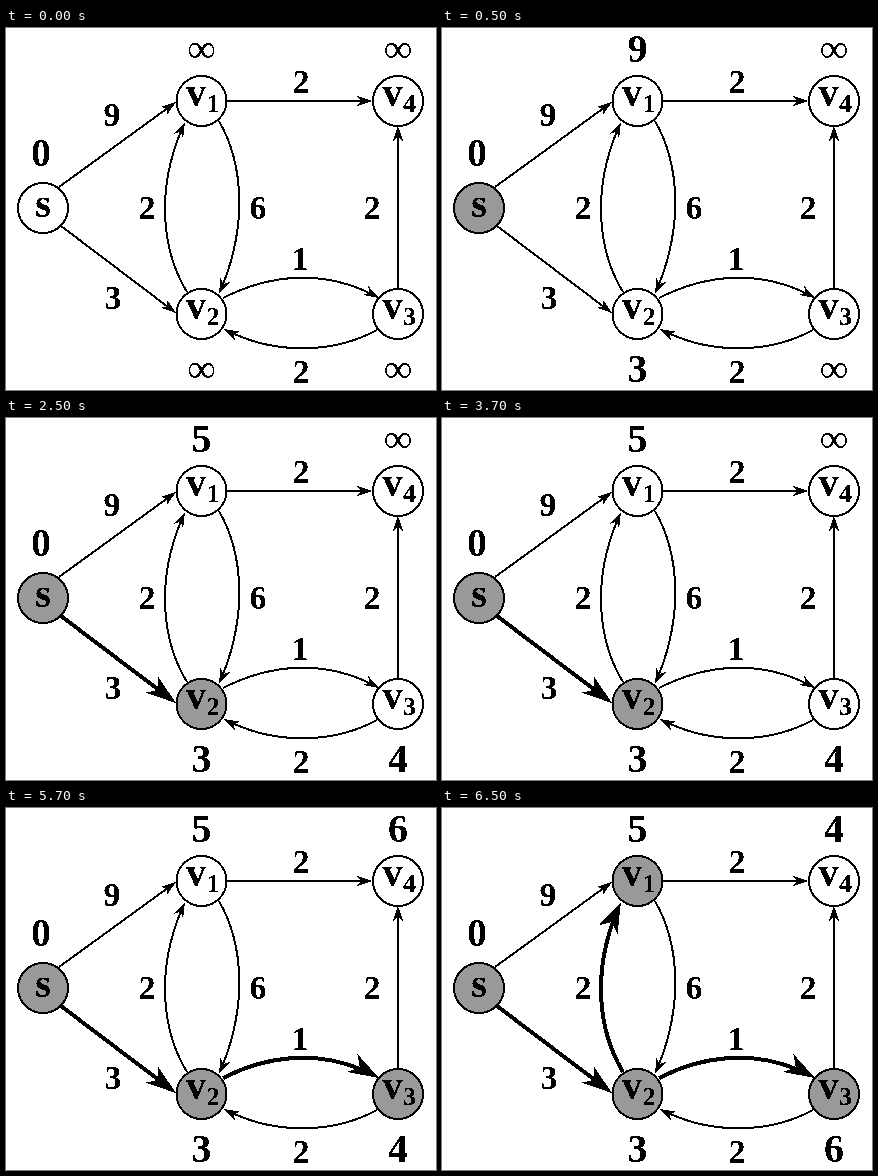
These frames come from a looping animation (430 by 362 pixels, 8 s). An HTML page:

```html
<!DOCTYPE html>
<html lang="en">
<head>
<meta charset="utf-8">
<title>Shortest paths</title>
<style>
  html, body { margin: 0; width: 100%; height: 100%; overflow: hidden; background: #fff; }
  svg { display: block; width: 430px; height: 362px; shape-rendering: crispEdges; }
  text { font: bold 34px "Liberation Serif", "Times New Roman", serif; text-anchor: middle; filter: url(#crisp); }
  .dist, .name { font-size: 40px; }
  .inf { font-weight: normal; }
  .sub { font-size: 26px; }
  .edge { fill: none; stroke: #000; marker-end: url(#tip); }
  circle { stroke: #000; stroke-width: 2; }
</style>
</head>
<body>
<svg id="stage" viewBox="0 0 430 362">
  <defs>
    <marker id="tip" viewBox="-8 -4 8 8" refX="0" refY="0" markerWidth="8" markerHeight="8" orient="auto">
      <path d="M0 0L-7.7 -2.6L-5.5 0L-7.7 2.6Z"/>
    </marker>
    <filter id="crisp">
      <feComponentTransfer><feFuncA type="discrete" tableValues="0 1"/></feComponentTransfer>
    </filter>
  </defs>
</svg>
<script>
const LOOP = 8000;
const STARTS = [0, 500, 2500, 4500, 6500];
const THIN = 2, BOLD = 4;
const NEVER = 9;
const stage = document.getElementById('stage');

function add(tag, attrs, text = '') {
  const el = document.createElementNS('http://www.w3.org/2000/svg', tag);
  for (const key in attrs) el.setAttribute(key, attrs[key]);
  el.textContent = text;
  return stage.appendChild(el);
}

// path, weight, weight x, weight baseline, step at which the edge joins the tree
const edges = [
  ['M53 159L170 74', 9, 106, 98, NEVER],
  ['M55 198L170 285', 3, 107, 281, 2],
  ['M221 73H366', 2, 295, 65, NEVER],
  ['M392 261V98', 2, 366, 191, NEVER],
  ['M181 264C152 216 152 152 179 94', 2, 141, 191, 4],
  ['M213 93C240 140 240 205 213 266', 6, 252, 191, NEVER],
  ['M217 270C270 243 325 243 373 270', 1, 294, 242, 3],
  ['M371 302C325 327 265 326 218 301', 2, 295, 355, NEVER]
].map(([d, weight, x, y, join]) => {
  add('text', { x, y }, weight);
  const path = add('path', { d, class: 'edge' });
  return { path, join, length: path.getTotalLength() };
});

// name, index, centre, label baseline, step at which it is settled, label per step
const nodes = [
  ['s', '', 37, 180, 138, 1, '00000'],
  ['v', 1, 195.5, 73, 34, 4, '∞9555'],
  ['v', 2, 195.5, 286, 354, 2, '∞3333'],
  ['v', 3, 392, 286, 354, 3, '∞∞446'],
  ['v', 4, 392, 73, 34, NEVER, '∞∞∞64']
].map(([name, index, x, y, base, settle, labels]) => {
  const ring = add('circle', { cx: x, cy: y, r: 25 });
  add('text', { x: index ? x - 5.5 : x, y: y + (index ? 5 : 9), class: 'name' }, name);
  if (index) add('text', { x: x + 11.5, y: y + 11, class: 'sub' }, index);
  const label = add('text', { x: index ? x : 35, y: base });
  return { ring, label, settle, labels };
});

function show(step) {
  for (const { path, join, length } of edges) {
    const width = step >= join ? BOLD : THIN;
    path.setAttribute('stroke-width', width);
    // stop the line inside the arrowhead so its point stays sharp
    path.setAttribute('stroke-dasharray', `${length - 5 * width} 999`);
  }
  for (const { ring, label, settle, labels } of nodes) {
    const value = labels[step];
    ring.setAttribute('fill', step >= settle ? '#999' : '#fff');
    label.textContent = value;
    label.setAttribute('class', value === '∞' ? 'dist inf' : 'dist');
  }
}

let begin, current;
function frame(now) {
  begin ??= now;
  const t = (now - begin) % LOOP;
  const step = STARTS.filter(start => start <= t).length - 1;
  if (step !== current) show(current = step);
  requestAnimationFrame(frame);
}
show(0);
requestAnimationFrame(frame);
</script>
</body>
</html>
```
